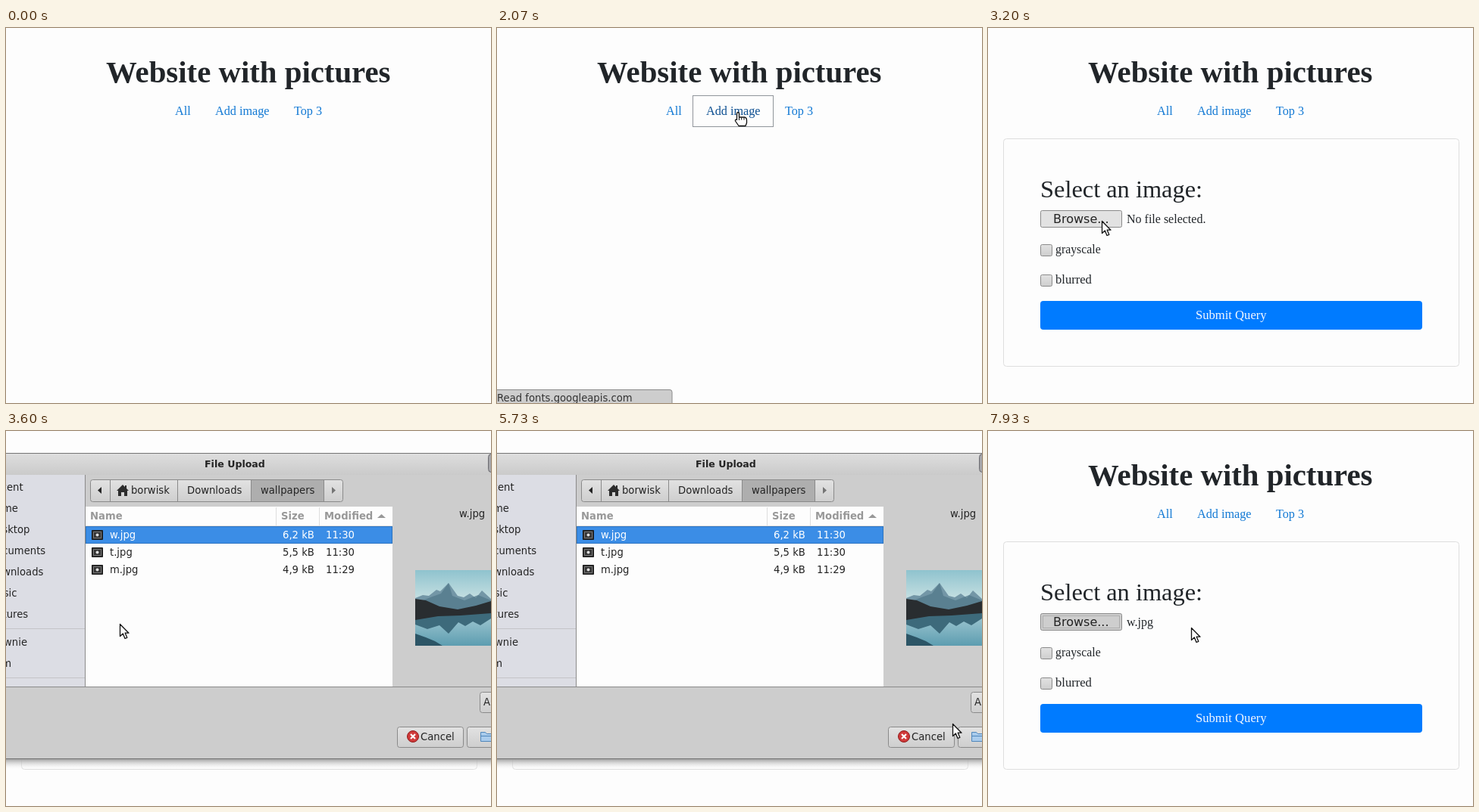
Recreate the animation shown at these times as an HTML page. Size 640 px wide and 496 px high, loop 8 s.

```html
<!DOCTYPE html>
<html lang="en">
<head>
<meta charset="utf-8">
<title>Image upload</title>
<style>
  html, body { margin: 0; width: 100%; height: 100%; overflow: hidden; background: #fdfdfd; }
  svg { display: block; width: 640px; height: 496px; }
  text { white-space: pre; }
  .serif { font: 16.2px "Liberation Serif", serif; fill: #212529; }
  .sans { font: 13.2px "DejaVu Sans", sans-serif; fill: #242424; }
  .bold { font-weight: bold; }
  .link { fill: #1279d4; }
  .link.hover { fill: #0d4f91; }
  .button { fill: url(#buttonFill); stroke: #8a8a8a; }
  .line { fill: none; stroke: #8a8a8a; }
  .head { fill: #989898; }
</style>
</head>
<body>
<svg viewBox="0 0 640 496">
  <defs>
    <linearGradient id="buttonFill" x2="0" y2="1"><stop stop-color="#e2e2e2"/><stop offset="1" stop-color="#cecece"/></linearGradient>
    <linearGradient id="titleFill" x2="0" y2="1"><stop stop-color="#dedede"/><stop offset="1" stop-color="#cacaca"/></linearGradient>
    <linearGradient id="shadow" x2="0" y2="1"><stop stop-color="#a2a2a2"/><stop offset="1" stop-color="#fdfdfd" stop-opacity="0"/></linearGradient>
    <linearGradient id="sky" x2="0" y2="1"><stop stop-color="#8fc3ce"/><stop offset="1" stop-color="#dcebea"/></linearGradient>
    <linearGradient id="lake" x2="0" y2="1"><stop stop-color="#a9cdd6"/><stop offset="1" stop-color="#5d9db0"/></linearGradient>
    <g id="fileIcon"><path d="M.5.5h14v12H.5z" fill="#343434" stroke="#151515"/><path d="M2.5 2.5h10v8h-10z" fill="none" stroke="#777"/><circle cx="7.5" cy="6.5" r="2" fill="#ddd"/></g>
  </defs>

  <g class="serif">
    <text class="bold" x="132" y="72" style="font-size:40.8px">Website with pictures</text>
    <text class="link" x="223" y="115">All</text>
    <text class="link" id="addLink" x="276" y="115">Add image</text>
    <text class="link" x="380" y="115">Top 3</text>
    <path id="focus" d="M258.5 89.5h106v41h-106z" fill="none" stroke="#222c38" stroke-dasharray="1 1"/>
  </g>

  <g id="form" class="serif">
    <rect x="20.5" y="146.5" width="601" height="301" rx="4" fill="none" stroke="#dedede"/>
    <text x="69" y="224" style="font-size:32.4px">Select an image:</text>
    <rect id="browse" class="button" x="69.5" y="241.5" width="107" height="22" rx="2"/>
    <path id="browseFocus" class="line" d="M72.5 244.5h101v16h-101z" stroke-dasharray="1 1"/>
    <text class="sans" x="86" y="258" style="font-size:16px">Browse...</text>
    <text id="fileName" x="183" y="258" style="font-size:16px"></text>
    <rect class="button" x="69.5" y="286.5" width="15" height="15" rx="2"/>
    <text x="89" y="298" style="font-size:15.8px">grayscale</text>
    <rect class="button" x="69.5" y="326.5" width="15" height="15" rx="2"/>
    <text x="89" y="338" style="font-size:16.6px">blurred</text>
    <rect x="69" y="361" width="504" height="38" rx="4" fill="#007bff"/>
    <text x="274" y="385" style="font-size:16.6px;fill:#f4f9ff">Submit Query</text>
  </g>

  <g id="status" class="sans">
    <path class="line" d="M-1 478.5H228q3 0 3 3V497H-1z" style="fill:#cdcdcd"/>
    <text id="statusText" x="0" y="494" fill="#333"></text>
  </g>

  <g id="dialog" class="sans">
    <path d="M0 434h640v14H0z" fill="url(#shadow)"/>
    <path d="M0 29h640v405H0z" fill="#cdcdcd"/>
    <path d="M0 30h640v28H0z" fill="url(#titleFill)"/>
    <path d="M0 29.5h640M0 433.5h640" stroke="#747474"/>
    <text class="bold" x="262" y="48" style="font-size:12.6px">File Upload</text>
    <rect x="636.5" y="30.5" width="20" height="24" rx="4" fill="#a6a6aa" stroke="#6a6a70"/>

    <path d="M0 58h105v280H0z" fill="#dcdde4"/>
    <path class="line" d="M104.5 58V338M0 338.5H640"/>
    <path d="M0 261.5h104M0 326.5h104" stroke="#c4c4c8"/>
    <g id="places"></g>

    <rect class="button" x="111.5" y="64.5" width="333" height="29" rx="3"/>
    <path d="M323 65h96v28h-96z" fill="#aeaeae"/>
    <path class="line" d="M137.5 65v28M226.5 65v28M323.5 65v28M419.5 65v28"/>
    <path d="M126 74v9l-5-4.5z" fill="#242424"/>
    <path d="M430 74v9l5-4.5z" fill="#747474"/>
    <path d="M146 79l8-8 3 3v-2h2v4l3 3h-2v7h-4v-5h-4v5h-4v-7z" fill="#2c2c2c"/>
    <text x="165" y="83">borwisk</text>
    <text x="239" y="83">Downloads</text>
    <text x="336" y="83">wallpapers</text>

    <path d="M105 100h405v238H105z" fill="#fdfdfd"/>
    <path d="M105 125.5H510M356.5 101v24M413.5 101v24" stroke="#dedede"/>
    <g class="bold">
      <text class="head" x="111" y="117">Name</text>
      <text class="head" x="363" y="117">Size</text>
      <text class="head" x="420" y="117">Modified</text>
    </g>
    <path d="M490 115h11l-5.5-5z" fill="#989898"/>
    <path d="M105 126h405v23H105z" fill="#3b8de6"/>
    <path id="rowFocus" d="M105.5 126.5h404v22h-404z" fill="none" stroke="#1f5a9c" stroke-dasharray="1 1"/>
    <g id="files"></g>

    <text x="598" y="114">w.jpg</text>
    <g id="preview">
      <path d="M540 184h100v54H540z" fill="url(#sky)"/>
      <path d="M540 236v-15l10-4 8 1 10-8 5 2 11-11 12 17 8 2 8-5 8 6 8-10 12 11v16z" fill="#7396a6"/>
      <path d="M540 236v-8l20-8 14-5 10-14 5 17 16 6 18-7 17 7v13z" fill="#52788a" opacity=".75"/>
      <path d="M540 238h100v46H540z" fill="url(#lake)"/>
      <path d="M540 240h100v8l-14 9-10-5-10 6-9-5-13 15-12-11-16 5-16-6z" fill="#3d6a7b"/>
      <path d="M540 222l14 2 18 8 24 4 24-5 20-6v16l-40 3-30 1-30 5z" fill="#292d30"/>
      <path d="M540 268l14 5 12 5 10 6h-36z" fill="#2c5566"/>
    </g>

    <rect class="button" x="625.5" y="345.5" width="30" height="27" rx="3"/>
    <text x="630" y="363">A</text>
    <rect class="button" x="516.5" y="391.5" width="87" height="27" rx="3"/>
    <circle cx="537" cy="404" r="7.5" fill="#d03a3a" stroke="#8f1818"/>
    <path d="M534 401l6 6m0-6l-6 6" stroke="#fff" stroke-width="2.2"/>
    <text x="547" y="409">Cancel</text>
    <rect id="open" class="button" x="608.5" y="391.5" width="50" height="27" rx="3"/>
    <path id="folder" d="M626.5 398.5h6l2 2h8v10h-16zM627 403.5h14" fill="#a9cbec" stroke="#4f86bb"/>
  </g>

  <g id="cursor" stroke="#111" stroke-linejoin="round">
    <path id="arrow" d="M.5.5V16.5L4.3 13 7 19.5 9.8 18.3 7.2 12.2H12z" fill="#fdfdfd" stroke-width="1.3"/>
    <g id="hand">
      <path d="M-1.5 8V.5Q-1.5-1.5 0-1.5T1.5.5V5H8.500Q11.5 5.5 11.5 9V12.5L10 16.5H1L-3.5 10Q-4 7.5-1.5 8.5z" fill="#fdfdfd" stroke-width="1.3"/>
      <path d="M1.5 5v4M4.7 5.500v3M8 5.500v3" fill="none"/>
    </g>
  </g>
</svg>

<script>
const $ = id => document.getElementById(id);
const show = (id, on) => { $(id).style.display = on ? '' : 'none'; };
const text = (x, y, s, extra = '') => `<text x="${x}" y="${y}" ${extra}>${s}</text>`;

$('places').innerHTML =
  ['Recent', 'Home', 'Desktop', 'Documents', 'Downloads', 'Music', 'Pictures']
    .map((name, i) => text(-23, 79 + 28 * i, name)).join('') +
  text(28, 284, 'wnie', 'text-anchor="end"') + text(7, 312, 'm', 'text-anchor="end"');

$('files').innerHTML = [['w', '6,2', '11:30'], ['t', '5,5', '11:30'], ['m', '4,9', '11:29']]
  .map(([name, size, time], i) => {
    const y = 142 + 23 * i;
    return `<g style="fill:${i ? '#242424' : '#fff'}"><use href="#fileIcon" x="113" y="${y - 11}"/>` +
      [[137, name + '.jpg'], [365, size + ' kB'], [422, time]]
        .map(([x, s]) => text(x, y, s, 'style="fill:inherit"')).join('') + '</g>';
  }).join('');

// Pointer stops: time, x, y
const stops = [
  [333, 617, 500], [1200, 318, 113], [2600, 318, 113], [3133, 150, 255],
  [3640, 150, 255], [4333, 463, 292], [4867, 463, 292], [5133, 540, 347],
  [5267, 540, 347], [5933, 617, 398], [7600, 617, 398], [7933, 268, 260]
];

function pointerAt(t) {
  const next = stops.findIndex(s => s[0] > t);
  if (next < 1) return stops[next ? stops.length - 1 : 0].slice(1);
  const [a, b] = [stops[next - 1], stops[next]];
  const u = (t - a[0]) / (b[0] - a[0]), k = u * u * (3 - 2 * u);
  return [a[1] + (b[1] - a[1]) * k, a[2] + (b[2] - a[2]) * k];
}

const TICK = 1000 / 15;

function draw(now) {
  const t = Math.floor((now % 8000) / TICK + 0.1) * TICK + 1;
  const between = (from, to) => t >= from && t < to;
  const [x, y] = pointerAt(t).map(Math.round);
  const inside = (l, top, r, b) => x >= l && x < r && y >= top && y < b;
  const hover = inside(258, 89, 366, 132);
  const dialog = between(3460, 7460);
  const loading = between(1800, 2400);

  show('form', t >= 2130);
  show('focus', between(1530, 2130));
  $('addLink').classList.toggle('hover', hover);
  show('status', loading || hover && t < 1800);
  $('statusText').textContent = !loading ? 'localhost:8080/add'
    : t < 1930 ? 'Waiting for localhost...' : 'Read fonts.googleapis.com';

  $('browse').style.fill = inside(69, 241, 177, 264) ? '#e2e2e2' : '#cecece';
  show('browseFocus', t >= 3330);
  $('fileName').textContent = t < 7460 ? 'No file selected.' : 'w.jpg';

  show('dialog', dialog);
  show('preview', t >= 3530);
  show('rowFocus', t < 7330);
  const overOpen = inside(608, 391, 640, 419);
  $('open').style.fill = t >= 7330 ? '#a4a4a4' : overOpen ? '#e6e6e6' : '';
  $('folder').style.fill = overOpen ? '#cfe6fb' : '';

  show('cursor', t >= 400);
  show('hand', hover);
  show('arrow', !hover);
  $('cursor').setAttribute('transform', `translate(${x} ${y})`);
  requestAnimationFrame(draw);
}
requestAnimationFrame(draw);
</script>
</body>
</html>
```
